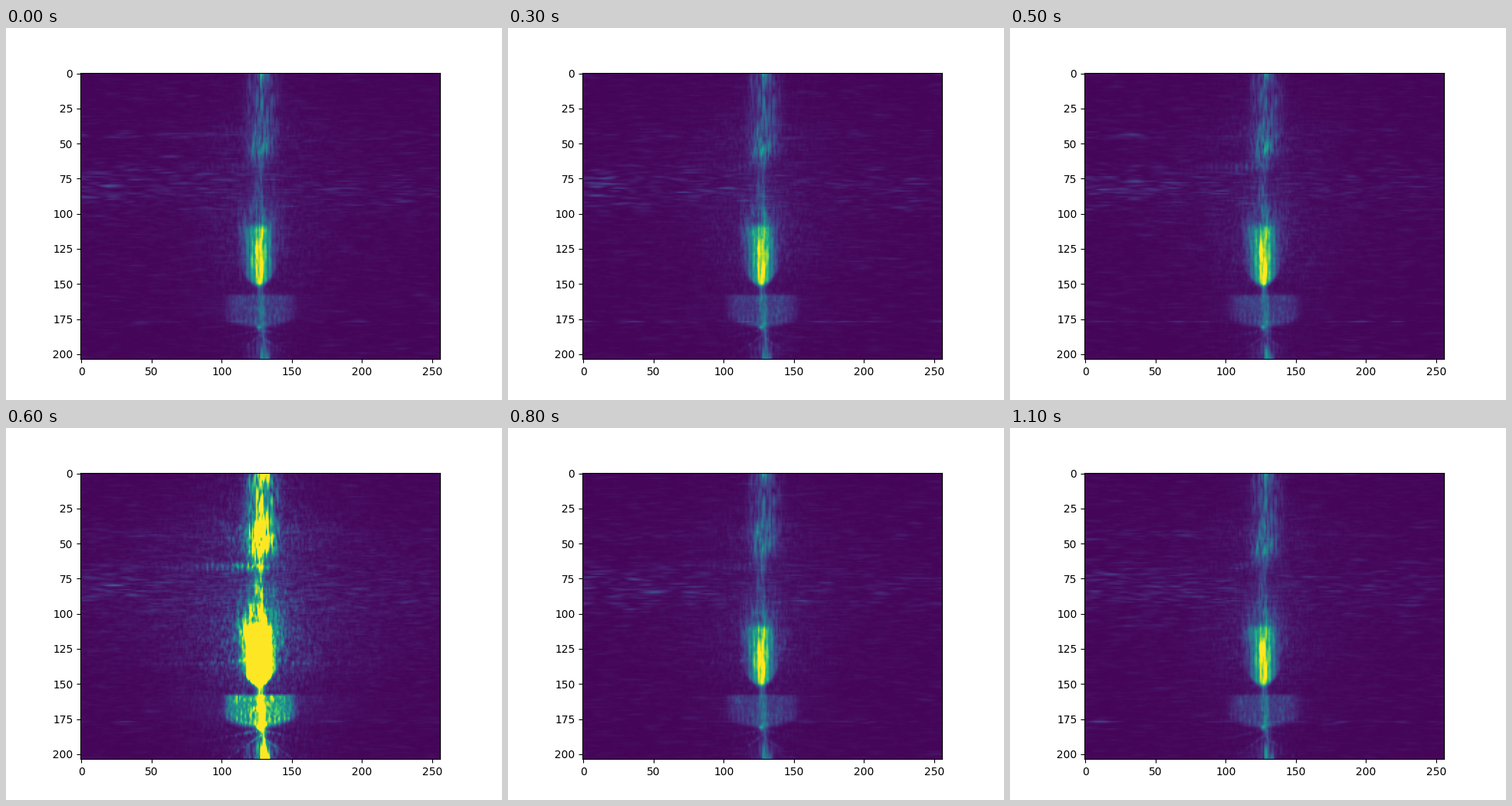
These frames come from a looping animation (640 by 480 pixels, 1.2 s). A matplotlib script:

```python
import numpy as np
import matplotlib.pyplot as plt
from matplotlib.animation import FuncAnimation

NY, NX, FRAMES, MS = 204, 256, 12, 100
FLASH, SHIFT = 6, 7  # frame of the bright burst, frame where the blob rises
y, x = np.mgrid[:NY, :NX].astype(float)
d = np.abs(x - 127.5)


def bell(t, w):
    return np.exp(-(t / w) ** 2)


def plateau(t, w, p=4):
    return np.exp(-np.abs(t / w) ** p)


def step(t, w=.7):
    return .5 + .5 * np.tanh(t / w)


def stripes(t, period):
    return .5 + .5 * np.cos(2 * np.pi * t / period)


def field(seed, sy, sx):
    """Complex noise smoothed by sy, sx with unit power."""
    rng = np.random.default_rng(seed)
    z = rng.normal(size=(NY, NX)) + 1j * rng.normal(size=(NY, NX))
    fy = np.fft.fftfreq(NY)[:, None]
    fx = np.fft.fftfreq(NX)
    k = np.exp(-2 * np.pi ** 2 * ((sy * fy) ** 2 + (sx * fx) ** 2))
    z = np.fft.ifft2(np.fft.fft2(z) * k)
    return z / np.sqrt(np.mean(np.abs(z) ** 2))


def speckle(i, seed, sy, sx, drift):
    """Texture that stays mostly in place and changes a little per frame."""
    fixed, fresh = field(seed, sy, sx), field(100 * seed + i, sy, sx)
    return np.abs(np.sqrt(1 - drift ** 2) * fixed + drift * fresh)


# Narrow column, slightly bowed, strongest at both ends
bow = 126.5 + 3.2 * ((y - 90) / 105) ** 2
width = 2.8 + 1.2 * bell(y - 50, 15) + 2.2 * bell(y - 102, 12)
core = (.14 + .24 * bell(y, 8) + .07 * bell(y - 95, 12)
        + .09 * bell(y - 168, 11) + .24 * bell(y - 203, 9))
core = core * bell(x - bow, width)

# Soft surroundings
halo = .1 * step(60 - y, 6) * plateau(x - 129, 12)
halo += .085 * bell(y - 112, 26) * step(152 - y, 2) * plateau(x - 127, 16)
halo += .08 * step(y - 193, 4) * plateau(x - 129, 11)
tail = .022 + .04 * bell(y - 45, 15) + .065 * bell(y - 118, 30)
tail = tail * np.exp(-d / 22)
fan = .014 * bell(y - 92, 55) * np.exp(-d / 75)

# Bright body: vertical stripes, hottest low in the middle
mid = 126 + (y - 115) * .04
heat = .4 + .62 * bell(x - 127.3, 5.5) * (.45 + .55 * step(y - 126, 10))
body = heat * (.6 + .4 * stripes(x - 128.2, 3.25)) * plateau(x - mid, 10.5)
body *= step(y - 109, 2.5) * step(151 - y - (x - 126.5) ** 2 / 14, 1.5)

# Lower block with a rippled base, a dot and two faint arcs
block = .13 * plateau(x - 127.5, 24, 8) * step(180 - y - d ** 2 / 120, 1.5)
block += .022 * np.exp(-d / 30) * step(176 - y, 4)
block *= step(y - 158) * (1 + .6 * step(y - 171, 2) * (stripes(d, 3.4) - .5))
dot = .4 * bell(x - 126.7, 1.7) * bell(y - 181, 1.4)
dot += .09 * bell(x - 127, 9) * bell(y - 179, 2)
arcs = sum(.08 * bell(y - top - slope * d, 1) * np.exp(-d / 12)
           for top, slope in ((183, .2), (187, .7)))

lobes = .2 * bell(y - 67, 3) * (.25 + .75 * stripes(x, 3.6))
lobes *= np.exp(-np.abs(x - 120) / np.where(x < 120, 21, 11))
sweep = .2 * bell(y - 131 - 5 * (1 - np.exp(-d / 20)), 1.4)
sweep *= np.exp(-d / 32) * step(d - 9, 2)

side = .45 + .55 * step(95 - x, 30)
streak_env = .2 + side * (bell(y - 82, 15) + .5 * bell(y - 44, 4))
streak_env += .7 * bell(y - 177, .8)


def image(i):
    near = speckle(i, 1, 4.5, .6, .35)
    fine = speckle(i, 2, 1.5, .6, .6)
    flat = speckle(i, 3, .6, 1.8, .8)
    streaks = speckle(i, 4, .6, 5, .9)

    blob_y = 55 - 14 * bell(i - SHIFT, 1.3)
    blob = .13 * bell(y - blob_y, 9) * plateau(x - 126.5, 9)
    a = (core + blob) * (.3 + .7 * near)
    a += halo * near + tail * fine + fan * flat
    a += body * (.8 + .15 * near)
    a += block * (.7 + .3 * fine) + dot + arcs * fine
    a += (.45 + .5 * bell(i - 5.5, 1.2)) * lobes * (.4 + .6 * fine)
    a += (bell(i - SHIFT, .8) + .5 * bell(i - 4, .8)) * sweep * fine
    if i == FLASH:
        a = 4 * a
    return a + .008 + .005 * flat + .03 * streak_env * streaks ** 2


fig, ax = plt.subplots(figsize=(6.4, 4.8), dpi=100)
im = ax.imshow(image(0), cmap="viridis", vmin=0, vmax=1)


def update(i):
    im.set_data(image(i))
    return im,


anim = FuncAnimation(fig, update, frames=FRAMES, interval=MS,
                     repeat=True, repeat_delay=0)
plt.show()
```
